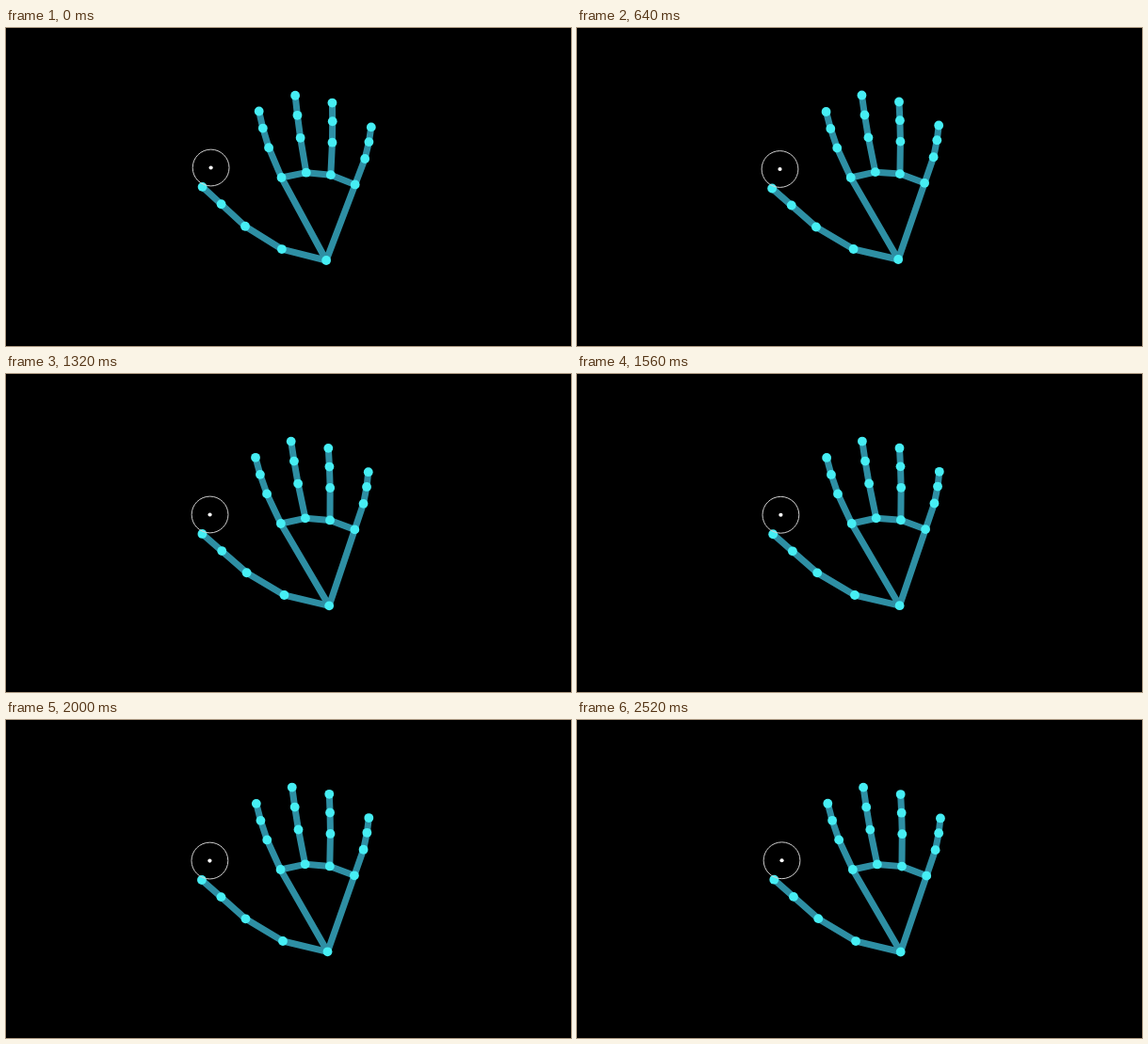
An HTML page with a canvas for the animation above (2560 ms loop, 600 px wide and 338 px high).

```html
<!DOCTYPE html>
<html lang="en">
<head>
<meta charset="utf-8">
<title>Hand tracking</title>
<style>
  html, body { margin: 0; width: 100%; height: 100%; overflow: hidden; background: #000; }
  canvas { display: block; width: 600px; height: 338px; }
</style>
</head>
<body>
<canvas id="stage" width="600" height="338"></canvas>
<script>
const ctx = document.getElementById('stage').getContext('2d');
const LOOP = 2560, STEP = 40;
const PIVOT = { x: 290, y: 165 };

// The hand at rest: four fingers rise from an arc of knuckles.
const cursor = [215.5, 150];
const thumb = [[340.5, 246], [293, 235], [253.5, 211.5], [227.5, 188.5], [207, 170.5]];
const fingertips = [[265, 89], [303, 71.5], [342.5, 78.5], [384.5, 103.5]];
const fingers = fingertips.map(makeFinger);

// Sway: sideways shift, then lean and tilt in pixels per 100 px from the pivot.
const sway = [
  { t: 0,    shift: 1.7, lean: 2.6,  tilt: 2 },
  { t: 360,  shift: 0,   lean: 0,    tilt: 0 },
  { t: 920,  shift: 0.2, lean: -1.4, tilt: 0 },
  { t: 1320, shift: 1.3, lean: -1.7, tilt: 0.7 },
  { t: 1760, shift: 0.9, lean: -0.9, tilt: 0 },
  { t: 2200, shift: 0.9, lean: 0.5,  tilt: 1.1 },
  { t: 2520, shift: 2.2, lean: -1.2, tilt: 1 }
];

function mix(a, b, k) {
  return a + (b - a) * k;
}

// Outer fingers bow away from the middle of the hand.
function makeFinger([tipX, tipY], i) {
  const knuckleX = 290.7 + 26.1 * i;
  const knuckleY = 152.9 + 3.9 * (i - 1.25) ** 2;
  const bow = (i - 1.5) * 1.85;
  return [0, 0.45, 0.743, 1].map(k => [
    mix(knuckleX, tipX, k) + bow * Math.sin(Math.PI * k),
    mix(knuckleY, tipY, k)
  ]);
}

function swayAt(t) {
  const next = Math.max(1, sway.findIndex(key => key.t >= t));
  const a = sway[next - 1], b = sway[next];
  const k = (t - a.t) / (b.t - a.t);
  const { shift, lean, tilt } = Object.fromEntries(
    Object.keys(a).map(name => [name, mix(a[name], b[name], k)]));
  return ([x, y]) => [
    x + shift + lean * (PIVOT.y - y) / 100,
    y + tilt * (x - PIVOT.x) / 100
  ];
}

function line(points) {
  ctx.beginPath();
  points.forEach(p => ctx.lineTo(...p));
  ctx.stroke();
}

function circle([x, y], radius) {
  ctx.beginPath();
  ctx.arc(x, y, radius, 0, Math.PI * 2);
}

function dot(point, radius, color) {
  ctx.fillStyle = color;
  circle(point, radius);
  ctx.fill();
}

function draw(t) {
  const move = swayAt(t);
  const thumbNow = thumb.map(move);
  const fingersNow = fingers.map(finger => finger.map(move));
  const wrist = thumbNow[0];
  const pointer = move(cursor);

  ctx.fillStyle = '#000';
  ctx.fillRect(0, 0, 600, 338);

  ctx.strokeStyle = '#2e8fa4';
  ctx.lineWidth = 7;
  ctx.lineJoin = 'round';
  line(thumbNow);
  line([wrist, ...fingersNow.map(finger => finger[0]), wrist]);
  fingersNow.forEach(line);
  [thumbNow, ...fingersNow].flat().forEach(p => dot(p, 4.9, '#46eef4'));

  ctx.strokeStyle = '#d0d0d0';
  ctx.lineWidth = 1;
  circle(pointer, 19.4);
  ctx.stroke();
  dot(pointer, 2.1, '#fff');
}

const start = performance.now();
function tick() {
  const t = (performance.now() - start) % LOOP;
  draw(Math.floor(t / STEP) * STEP);
  requestAnimationFrame(tick);
}
tick();
</script>
</body>
</html>
```
